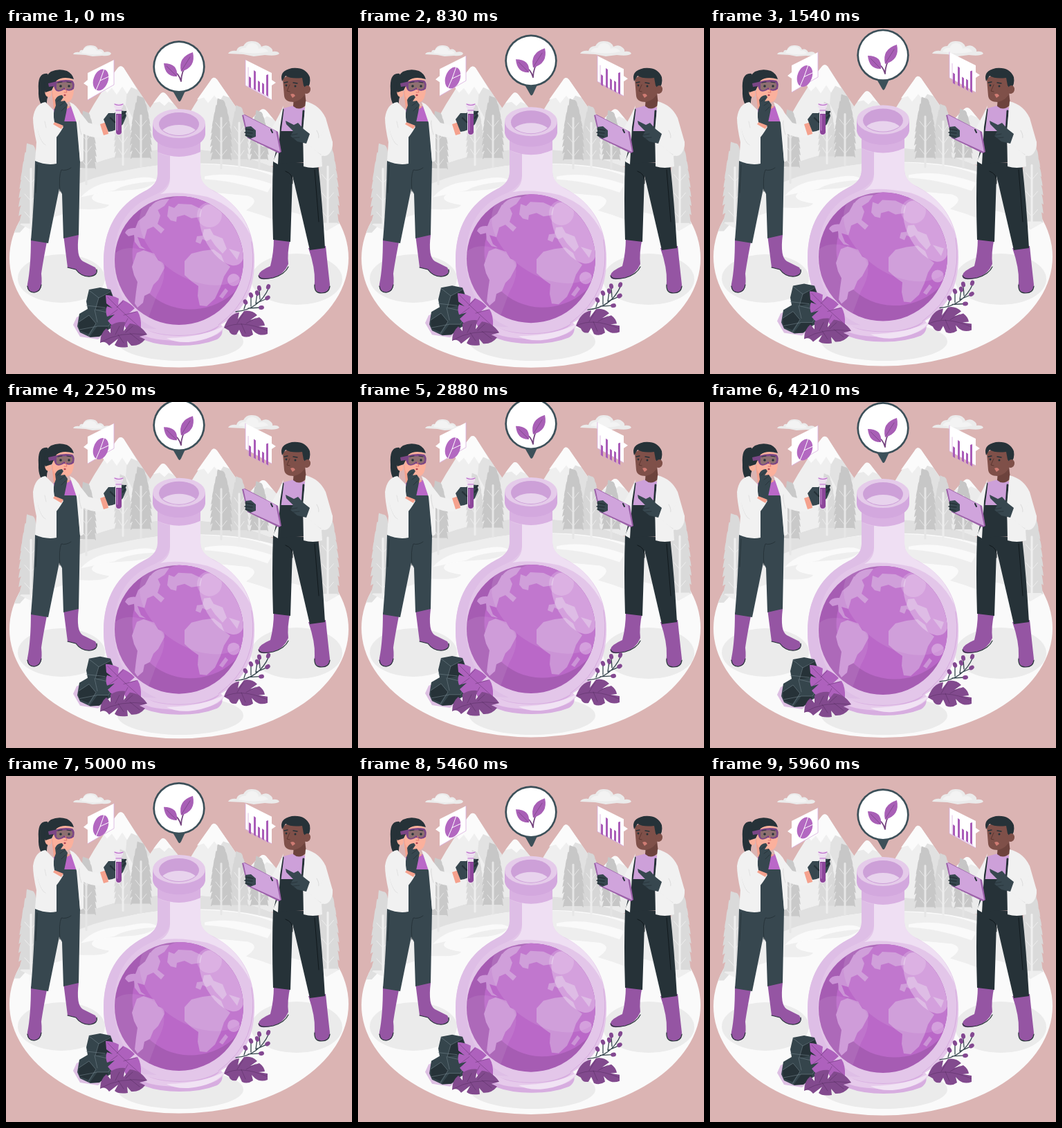
Write an HTML page with a canvas that moves like this. It is 500x500 px and loops after 6000 ms.

```html
<!DOCTYPE html>
<html lang="en">
<head>
<meta charset="utf-8">
<title>Flask world</title>
<style>
html,body{margin:0;width:100%;height:100%;overflow:hidden;background:#dbb4b3}
canvas{display:block;width:100%;height:100%}
</style>
</head>
<body>
<canvas id="stage"></canvas>
<script>
const canvas = document.getElementById('stage');
const c = canvas.getContext('2d');
const ratio = Math.max(1, window.devicePixelRatio || 1);
canvas.width = canvas.height = 500 * ratio;
const LOOP = 6000;
const DARK = '#263238', SLATE = '#37474f', PURPLE = '#ba68c8', BOOT = '#9555a3', COAT = '#f1f1f1', BROWN = '#7f5049';

const cache = {};
const path = d => cache[d] || (cache[d] = new Path2D(d));
function fill(color, d) { c.fillStyle = color; c.fill(path(d)); }
function line(color, w, d) {
  c.strokeStyle = color; c.lineWidth = w;
  c.lineCap = c.lineJoin = 'round';
  c.stroke(path(d));
}
function oval(color, x, y, rx, ry = rx, turn = 0) {
  c.fillStyle = color;
  c.beginPath(); c.ellipse(x, y, rx, ry, turn, 0, 7); c.fill();
}
function shifted(dy, draw) { c.save(); c.translate(0, dy); draw(); c.restore(); }

function clouds() {
  fill('#ebebeb', 'M97 38Q99 34 106 35Q107 31 111 32Q114 24 123 25Q131 25 133 31Q139 29 142 35Q150 33 152 37Q150 41 139 40L125 41L115 39Z');
  fill('#f3f3f3', 'M109 36Q113 26 123 27Q130 28 131 33Q137 32 140 37Q128 40 109 36Z');
  fill('#ebebeb', 'M321 37Q324 32 333 33Q335 26 343 26Q347 18 356 19Q366 19 369 27Q377 23 382 28Q386 31 385 34Q393 33 395 37Q391 41 374 39L358 41L343 38Z');
  fill('#f3f3f3', 'M336 34Q340 28 346 29Q350 20 358 22Q365 24 365 30Q374 27 379 34Q358 39 336 34Z');
}

function mountains() {
  fill('#efefef', 'M97 165Q126 108 161 59Q165 53 170 58Q190 91 220 132L235 200L97 205Z');
  fill('#e2e2e2', 'M168 56Q190 88 222 137L230 200L190 200L184 132L173 112L175 90Z');
  fill('#fbfbfb', 'M140 86Q151 71 161 59Q165 53 170 58Q181 75 190 90L181 86L175 96L168 85L160 97L153 87L146 94Z');
  fill('#eaeaea', 'M188 150Q206 116 223 96Q227 91 232 97L275 150L275 200L188 200Z');
  fill('#fafafa', 'M213 109Q220 99 224 95Q228 91 233 98L242 110L235 107L229 113L222 107Z');
  fill('#efefef', 'M250 150Q272 110 296 76Q300 69 305 75L352 143L370 200L250 200Z');
  fill('#e1e1e1', 'M302 72L352 143L366 200L325 200L313 131L306 112Z');
  fill('#fbfbfb', 'M276 104Q288 87 296 76Q300 69 305 75L323 101L314 98L308 107L301 98L292 109L286 101Z');
  fill('#ebebeb', 'M333 160Q352 133 367 120Q372 115 377 121L415 165V200H333Z');
  fill('#fafafa', 'M355 133Q363 123 368 119Q373 115 378 122L386 132L377 128L370 134L364 129Z');
}

// Pine with ragged sides tapering to a rounded tip.
function pine(x, top, base, w, color, trunk, foot) {
  const rows = 9, h = base - top;
  c.fillStyle = color;
  c.beginPath(); c.moveTo(x, top);
  for (const side of [1, -1]) {
    for (let k = 0; k < rows; k++) {
      const i = side > 0 ? k : rows - 1 - k;
      const reach = w * Math.pow(Math.sin((i + 1.6) / (rows + 1.6) * 2.15), .8);
      const y = top + h * (i + 1) / rows;
      if (side > 0) { c.quadraticCurveTo(x + reach * .9, y - h / rows, x + reach, y); c.lineTo(x + reach * .84, y - 2); }
      else { c.lineTo(x - reach * .84, y - 2); c.lineTo(x - reach, y); c.quadraticCurveTo(x - reach * .9, y - h / rows, x - reach * .8, y - h / rows - 2); }
    }
  }
  c.closePath(); c.fill();
  c.strokeStyle = trunk; c.lineCap = 'round';
  c.lineWidth = 3;
  c.beginPath(); c.moveTo(x, top + h * .3); c.lineTo(x, foot); c.stroke();
  c.lineWidth = 1;
  c.beginPath();
  for (let i = 4; i < 9; i += 2) {
    const y = top + h * i / rows, r = w * .5;
    c.moveTo(x - r, y - 6); c.lineTo(x, y + 4); c.lineTo(x + r, y - 6);
  }
  c.stroke();
}

function scenery() {
  mountains();
  oval('#fafafa', 250, 333, 245, 158);
  c.save();
  c.beginPath(); c.ellipse(250, 333, 245, 158, 0, 0, 7); c.clip();
  fill('#e0e0e0', 'M0 160H500V290L455 240Q400 207 330 199Q245 190 172 207Q80 226 20 296H0Z');
  fill('#eeeeee', 'M20 284Q80 222 170 207Q245 190 335 201Q420 213 482 283L463 294Q440 270 408 266L386 277Q368 270 347 264Q369 249 350 243L308 239Q280 232 282 220L219 217Q216 230 187 234L132 238Q110 250 149 256Q145 264 106 262L62 276Q40 277 34 291Z');
  fill('#fafafa', 'M108 245Q128 222 170 221Q210 211 220 222Q174 224 157 235ZM287 215Q326 206 385 226L378 238Q330 221 287 219Z');
  c.restore();
  pine(169, 111, 190, 13, '#d9d9d9', '#eee', 198);
  pine(195, 100, 190, 16, '#c7c7c7', '#e6e6e6', 201);
  pine(116, 122, 205, 15, '#c9c9c9', '#e6e6e6', 226);
  pine(337, 114, 192, 14, '#d6d6d6', '#ededed', 206);
  pine(366, 121, 192, 14, '#c6c6c6', '#e4e4e4', 204);
  pine(311, 104, 192, 16, '#c7c7c7', '#e6e6e6', 203);
  pine(36, 169, 285, 18, '#dadada', '#efefef', 290);
  pine(465, 165, 284, 17, '#dadada', '#efefef', 289);
}

function shadows() {
  oval('#ebebeb', 80, 362, 63, 35);
  oval('#ebebeb', 420, 363, 66, 37);
  oval('#ebebeb', 252, 453, 91, 28);
}

function globe() {
  oval('#a65cb3', 250, 336, 93);
  c.save();
  c.beginPath(); c.arc(250, 336, 93, 0, 7); c.clip();
  oval(PURPLE, 270, 323, 88, 83, -.35);
  const land = '#cb94d6';
  fill(land, 'M172 296Q175 288 187 289L191 279L201 271L208 258L218 260L223 271L219 283L229 291L224 297L213 287L204 291L200 305L190 302L195 315L202 320L193 318L186 309L185 299L177 301Z');
  fill(land, 'M209 258Q217 247 236 247L229 257L218 264Z');
  fill(land, 'M189 325L199 321L214 326L220 336Q230 339 229 347L220 364L213 371L208 383L200 387L198 397L190 404L186 398L188 381L190 367L185 357L182 345Z');
  fill(land, 'M233 272L235 257L243 260L249 254L268 255L283 262L281 273L268 275L258 270L247 273L246 280L238 278Z');
  fill(land, 'M274 309L276 301L284 300L286 291L295 290L300 299L313 304L319 319L313 326L302 314L296 305L290 308L284 305L281 312Z');
  fill(land, 'M258 337L268 326L284 322L300 320L311 328L315 338L324 345L315 359L310 374L302 391L290 402L280 401L277 387L278 373L268 366L258 357Z');
  fill(land, 'M308 388L317 376L321 380L313 391ZM322 319L338 324L334 335Z');
  // Glassy reflections
  oval('rgba(255,255,255,.1)', 273, 304, 88, 57, .58);
  oval('rgba(255,255,255,.3)', 312, 299, 25, 49, -.52);
  oval('rgba(255,255,255,.18)', 294, 270, 18);
  oval('rgba(255,255,255,.3)', 329, 364, 9);
  fill('rgba(255,255,255,.08)', 'M155 327Q177 309 211 327Q242 345 218 386L202 429L145 420Z');
  c.restore();
}

function flask() {
  fill('#d7ade0', 'M191 425Q186 443 200 451Q221 459 251 459Q283 459 305 450Q318 442 309 425Z');
  fill('#e6caeb', 'M196 427Q202 444 250 445Q301 444 310 428L315 434Q303 452 250 452Q197 451 191 437Z');
  fill('#e3c6e9', 'M219 162H281V211Q281 227 300 235Q359 267 359 337Q359 405 306 431Q285 444 250 444Q215 444 194 432Q141 405 141 338Q141 267 200 236Q219 227 219 211Z');
  fill('#debee6', 'M219 179Q228 185 237 185V216Q235 233 211 243Q154 267 156 341Q161 411 218 435L200 434Q141 406 141 338Q141 267 200 236Q219 227 219 211Z');
  fill('#efdff3', 'M237 177H281V211Q281 225 299 235Q340 255 353 299Q333 258 291 244Q250 235 223 240Q237 232 237 217Z');
  fill('#d9b1e2', 'M219 165H281V179Q250 193 219 179Z');
  fill('#d3a8de', 'M212 138V154C216 181 284 181 288 154V138Z');
  oval('#e5cbea', 250, 138, 38, 21);
  oval('#cda0d8', 250, 139, 29, 17);
  c.save();
  c.beginPath(); c.ellipse(250, 139, 28, 16, 0, 0, 7); c.clip();
  oval('#e8d3ed', 250, 157, 29, 17);
  c.restore();
  globe();
  fill('#f1e3f4', 'M232 448Q286 447 318 429Q304 450 264 454Q244 455 232 448Z');
  line('#d6aade', 1, 'M355 309Q367 386 307 429');
}

function leaf(color, d, vein) {
  fill(color, d);
  line('rgba(67,34,77,.5)', .7, vein);
}

function foreground() {
  fill('#ddbfe3', 'M102 418L97 429L107 446L133 450L155 431L143 414L116 412Z');
  fill('#35454c', 'M120 378L136 375L151 378L160 402L160 429L146 437L135 446L122 447L107 440L103 431L106 413L118 406L116 395Z');
  fill(DARK, 'M134 390L151 380L157 400L145 404L129 407ZM105 425L120 415L130 427L119 442L106 437ZM132 431L148 431L146 438L134 446L121 446Z');
  line('#71828a', .6, 'M120 379L134 390L151 381M134 390L129 407L150 412M116 401L143 404M105 425L120 415L130 427L119 445M106 436L132 431L148 431L157 415M132 425L128 407');
  leaf('#ae61bd', 'M144 386Q153 386 163 391L162 400L169 393Q180 398 186 405L178 412L190 409Q196 418 195 434Q187 439 175 438L171 430L168 437Q154 433 147 423L157 414L146 417Q143 409 146 402L154 405L145 398Z', 'M147 389Q163 406 195 434M160 404L169 395M170 415L188 410M161 407L149 416M176 420L169 433');
  leaf('#824a8e', 'M136 455Q136 441 145 434L151 441L151 430Q160 424 172 425L170 438L179 427Q194 428 204 443L193 446L201 450Q193 460 181 459L175 452L176 461Q162 463 157 458L162 449L149 459Q143 451 136 455Z', 'M137 454Q164 438 203 443M158 443L164 431M173 440L183 431M162 443L170 455M179 441L193 452');
  leaf('#824a8e', 'M315 433Q322 413 337 411L335 421L344 409Q355 407 363 415L353 422L366 418Q373 423 374 430L365 431L378 433V442Q368 446 360 440L355 435L357 443Q349 449 341 445L337 436L333 443Q325 445 322 437Z', 'M316 433Q339 421 377 437M334 427L343 413M347 427L361 419M340 427L346 441');
  line(SLATE, 1.3, 'M332 410Q366 407 380 375M344 406L347 397M354 402L354 387M361 398L363 383M367 392L366 378M350 405L368 404M361 398L377 391');
  const berries = [[379, 374, .3], [366, 376, -.2], [363, 383, -.3], [354, 386, -.4], [346, 396, -.5], [369, 404, 1.4], [378, 390, 1]];
  for (const [x, y, turn] of berries) oval('#834891', x, y, 3, 4, turn);
}

function woman() {
  fill(DARK, 'M60 66Q45 64 47 90Q46 111 59 119Q57 101 65 89Z');
  // Boots and legs
  fill(BOOT, 'M36 304H60Q53 340 51 355Q54 382 42 382Q29 382 31 370Q36 345 36 304ZM83 299H105Q101 331 111 337L129 346Q135 356 122 359Q109 360 101 349L89 346Z');
  line(DARK, 1.2, 'M31 373Q32 383 42 382Q50 380 51 371M89 346L101 349Q109 360 122 359Q133 357 131 349');
  fill(SLATE, 'M42 192H107L105 299L83 304L81 240L77 232L61 311L36 307Q41 250 42 192Z');
  line('#27343a', 1, 'M78 236Q76 214 80 205Q87 207 94 202M45 198L43 238');
  // Torso
  fill(PURPLE, 'M69 117L94 113L104 138H70Z');
  fill('#f5a18d', 'M66 91H83L83 108Q88 113 93 114Q80 123 69 116Z');
  fill(SLATE, 'M72 135H103L107 195H70Z');
  fill(COAT, 'M57 107Q42 109 39 130Q39 143 44 165L42 192Q58 199 73 196L73 154L69 119Z');
  fill(COAT, 'M92 107Q102 111 108 123L119 137L139 142L144 157Q128 161 112 153L112 191Q109 194 107 193L102 137Z');
  line('#d6d6d6', .8, 'M109 154Q105 142 106 134M46 146Q50 166 57 169');
  fill('#f5a18d', 'M136 139L145 136L148 153L141 155Z');
  // Raised hand with tube
  fill(SLATE, 'M141 132L148 123L157 123L160 119L172 120L174 127L169 139Q160 149 148 150Z');
  fill('#eddff0', 'M157 109H169V114L167 116V151Q167 155 163 155Q158 155 158 150V116L156 114Z');
  fill('#8c459a', 'M159 124H167V151Q166 154 163 154Q159 154 159 150Z');
  line(PURPLE, 1.2, 'M157 110Q163 113 169 110M159 119H167');
  line('#c58fd0', 1, 'M161 126V148');
  line(DARK, 2.4, 'M169 124L173 121M169 130L172 126M151 130L157 136');
  // Face
  fill('#fbb09c', 'M66 78Q78 68 96 74Q100 91 96 100Q94 107 85 108Q72 110 68 98Z');
  oval('#fbb09c', 61, 94, 4.5, 6, -.2);
  fill(DARK, 'M57 93Q52 72 65 63Q76 58 88 62Q96 66 98 74Q82 69 73 76L66 90Z');
  fill('#7b4686', 'M61 80L70 78Q84 73 96 76Q100 79 98 88Q94 92 87 90Q84 88 82 90Q74 94 71 89L69 84L62 85Z');
  fill('#8e7070', 'M73 80Q83 77 95 79Q98 84 94 88Q88 90 84 86Q76 93 73 88Z');
  oval(DARK, 79, 84, 1.8); oval(DARK, 91, 84, 1.7);
  line(DARK, 1, 'M75 79L81 78M88 78L94 79');
  line('#e67870', 1, 'M86 87L88 93L84 93'); oval('#af4353', 85, 97, 1.6, 1.2);
  // Thinking arm
  fill(COAT, 'M43 133Q48 165 58 169Q69 167 83 143L71 135L59 144L55 113Z');
  line('#dcdcdc', .8, 'M58 144L56 135');
  fill('#f5a18d', 'M71 135L83 141L80 146L68 139Z');
  fill(SLATE, 'M70 136Q67 122 72 112L71 104Q74 97 81 97L83 100L79 106L85 105L89 111L87 122L83 141Z');
  line(DARK, .8, 'M74 106L80 101M78 112L85 107M80 120L86 114');
}

function man() {
  // Boots and legs
  fill(BOOT, 'M387 303H411Q406 326 408 341Q402 356 386 361Q363 367 365 357Q366 351 382 344Q387 325 387 303ZM437 318L462 315Q465 345 468 371Q467 384 455 383Q444 381 446 367Q447 347 437 318Z');
  line(DARK, 1.2, 'M365 358Q367 365 386 361Q403 356 408 345M446 371Q445 383 456 383Q467 383 468 373');
  fill(DARK, 'M386 192L451 196Q457 250 461 318L439 321L417 226L414 214L411 309L386 306Q384 245 386 192Z');
  line('#11191d', 1, 'M414 225Q416 211 404 207M446 205L452 280');
  // Torso
  fill('#cda0d9', 'M401 116L420 111L434 116L431 160H396Z');
  fill('#6d433d', 'M416 100L432 93L434 111Q424 121 415 113Z');
  fill(DARK, 'M395 149L428 149L432 194L386 196L393 165Z');
  line(DARK, 3, 'M400 118L396 150M430 120L428 150');
  fill(COAT, 'M401 112L395 125L384 145L361 157L370 171L394 174L386 193L393 197L396 143Z');
  fill(COAT, 'M433 106Q453 111 462 130L472 165Q473 183 456 185L457 200Q443 204 430 200L429 148Z');
  line('#d5d5d5', .8, 'M455 183L438 169M449 148Q454 157 451 160');
  // Tablet
  fill('#9c61a9', 'M341 126L345 125L393 150L398 179L394 181L349 159Z');
  fill('#d0a4dc', 'M343 125L390 149L396 179L350 158Z');
  line(DARK, 2, 'M383 147L385 151');
  fill(SLATE, 'M346 143L354 142L361 148L361 157L353 160L346 156Z');
  line(DARK, 1.4, 'M346 146L357 148M345 151L356 152M346 155L355 157');
  // Pointing arm
  fill(COAT, 'M438 151L453 160L461 145L472 165Q471 184 460 185Q448 180 433 165Z');
  fill(SLATE, 'M404 134L416 140L422 137L430 146L439 153L434 167L421 164L411 156L415 149L405 139Z');
  line(DARK, .8, 'M411 155L421 153M415 159L424 158');
  // Head
  fill(BROWN, 'M400 74Q408 64 435 70L434 92Q429 104 416 107Q403 107 402 98Z');
  fill(DARK, 'M399 77Q394 62 413 58Q433 56 439 71Q441 82 434 89L430 83L428 72Q412 74 404 69Z');
  oval(BROWN, 435, 89, 5, 6, .3);
  oval(DARK, 405, 83, 1.4); oval(DARK, 418, 84, 1.5);
  line(DARK, 1.3, 'M402 79L407 78M415 79L421 80');
  line('#5a352f', 1, 'M410 82L406 91L410 92');
  fill('#cf7c74', 'M411 96Q416 93 418 98L414 101Z');
}

function panels(s) {
  shifted(-16.4 * s, () => {
    fill('#fff', 'M118 65L156 46V82L118 104V84L112 80L118 75Z');
    line('#d7addf', .8, 'M156 46V82L118 104');
    fill('#fff', 'M346 46L384 65V75L390 79L384 83V104L346 83Z');
    line('#d7addf', .8, 'M346 46V83L384 104');
  });
  shifted(-8.2 * s, () => {
    oval('#b368c1', 137, 75, 10.5, 16, .35);
    line('#fff', 1, 'M142 59L136 76L149 70M136 76L130 90');
    line('#d1a2da', .7, 'M350 57V84L380 100');
    fill('#a95cb8', 'M351 70L354 72V87L351 85ZM358 61L361 63V90L358 88ZM364 76L367 78V93L364 91ZM370 79L373 81V96L370 94ZM376 68L379 67V99L376 97Z');
  });
}

function badge(s) {
  shifted(-24.6 * s, () => {
    fill('#3c5059', 'M241 91L249 105Q251 108 253 104L259 91Z');
    oval('#3c5059', 250, 56, 37.7);
    oval('#fff', 250, 56, 35);
  });
  shifted(-16.2 * s, () => {
    line('#75447f', 1.8, 'M253 77Q250 66 241 61M253 77Q253 64 263 48');
    fill('#a85fb6', 'M228 51Q249 51 247 70Q230 71 228 51ZM253 63Q248 42 270 35Q275 57 253 63Z');
    line('#75447f', .7, 'M232 55L246 69M254 61L266 42');
  });
}

function draw(t) {
  // The floating parts rise quickly and settle more softly.
  const s = Math.pow(Math.sin(Math.PI * t / LOOP), t < LOOP / 2 ? 1.2 : 1.4);
  // The landscape rises and falls at a steady speed, slightly later.
  const phase = (t - 450 + LOOP) % LOOP / LOOP;
  const drift = 1 - 9.4 * (1 - Math.abs(1 - 2 * phase));
  c.setTransform(ratio, 0, 0, ratio, 0, 0);
  c.fillStyle = '#dbb4b3';
  c.fillRect(0, 0, 500, 500);
  clouds();
  shifted(drift, scenery);
  shadows();
  panels(s);
  woman();
  man();
  shifted(-8.1 * s, () => { flask(); foreground(); });
  badge(s);
}

function tick(now) {
  draw(now % LOOP);
  requestAnimationFrame(tick);
}
draw(0);
requestAnimationFrame(tick);
</script>
</body>
</html>
```
